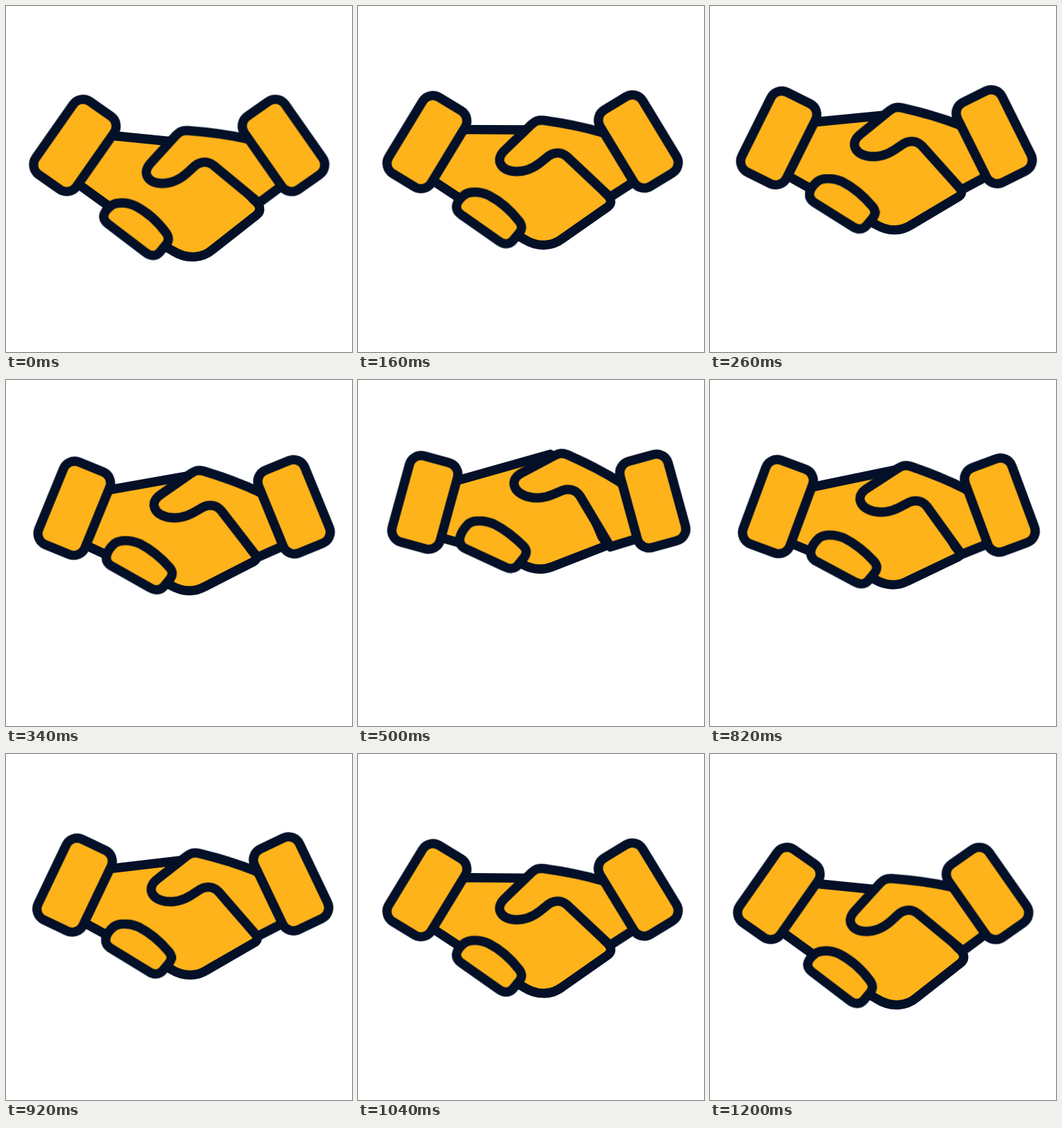
An HTML page without scripts that plays this animation: 500x500 px, repeating every 1.5 s.

```html
<!DOCTYPE html>
<html lang="en">
<head>
<meta charset="utf-8">
<title>Handshake</title>
<style>
  html, body { margin: 0; width: 100%; height: 100%; overflow: hidden; background: #fff; }
  svg { display: block; width: 100%; height: 100%; }

  .ink { fill: #ffb31a; stroke: #031027; stroke-width: 13.4; stroke-linejoin: round; }

  /* Rise for 600 ms, fall for 600 ms, rest for 300 ms */
  .move { animation: 1500ms cubic-bezier(.3333, 0, .6667, 1) infinite; }
  .left-arm { animation-name: left-swing; transform-origin: 26.5px 197px; }
  .right-arm { animation-name: right-swing; transform-origin: 489.8px 259.8px; }
  .palm { animation-name: palm; }
  .finger { animation-name: finger; }

  @keyframes left-swing {
    0%, 80%, 100% { transform: rotate(0deg); }
    40% { transform: rotate(-21.2deg); }
  }
  @keyframes right-swing {
    0%, 80%, 100% { transform: rotate(0deg); }
    40% { transform: rotate(21.2deg); }
  }
  @keyframes palm {
    0%, 80%, 100% {
      d: path("M130 184.5 L240 195.5 L300 215 L358 280 C366 286 370 295 361 302 L298 351.5 C284 363.5 262 367 240 353 L200 330 L147 288 L100 254 Z");
    }
    40% {
      d: path("M124.6 147.2 L280 99.9 L321.6 144.8 L351.5 221.7 C357.4 229.8 360.3 233.4 355.6 235 L279 262.9 C266.5 267.4 252 267 237 259 L200 243.6 L150.2 231.8 L116 223.8 Z");
    }
  }
  @keyframes finger {
    0%, 80%, 100% {
      d: path("M147 314.5 L201.5 356 C209.5 362 217 361 222 355 L229 346.5 C236 339.5 235 333.5 231 327.5 C220 312.5 204 297.5 186.5 288.5 C174 282.5 158 282.5 151 288.5 C138 298.5 138 307.5 147 314.5 Z");
    }
    40% {
      d: path("M153.5 236.7 L211.5 262.3 C219.1 266.2 226.1 265.2 230.1 261.4 L239.2 250.4 C245.1 243.4 244.1 237.4 239.1 232.5 C226 219.6 211.8 208.9 196.2 201 C182.6 196.1 168.8 195 159.6 201 C147.7 213.2 141.2 228.7 153.5 236.7 Z");
    }
  }
</style>
</head>
<body>
<svg viewBox="0 0 500 500" class="ink">
  <defs>
    <rect id="cuff" x="-36" y="-64.5" width="72" height="129" rx="17.5"/>
  </defs>
  <g transform="translate(.5 .5)">
    <path class="move palm"/>
    <g class="move right-arm">
      <path d="M372 198 L345 191 Q310 183 262 179.5 C254 179 250 181.5 245 186.5 L209 226 C194 242 206 256 226 256 C240 255.5 251 250 261 241 L273 230 C281 224 291 223.5 299 229.5 L365 284 L400 258 Z"/>
      <use href="#cuff" transform="translate(400.5 201) rotate(-35)"/>
    </g>
    <g class="move left-arm">
      <use href="#cuff" transform="translate(99 201) rotate(35)"/>
    </g>
    <path class="move finger"/>
  </g>
</svg>
</body>
</html>
```
